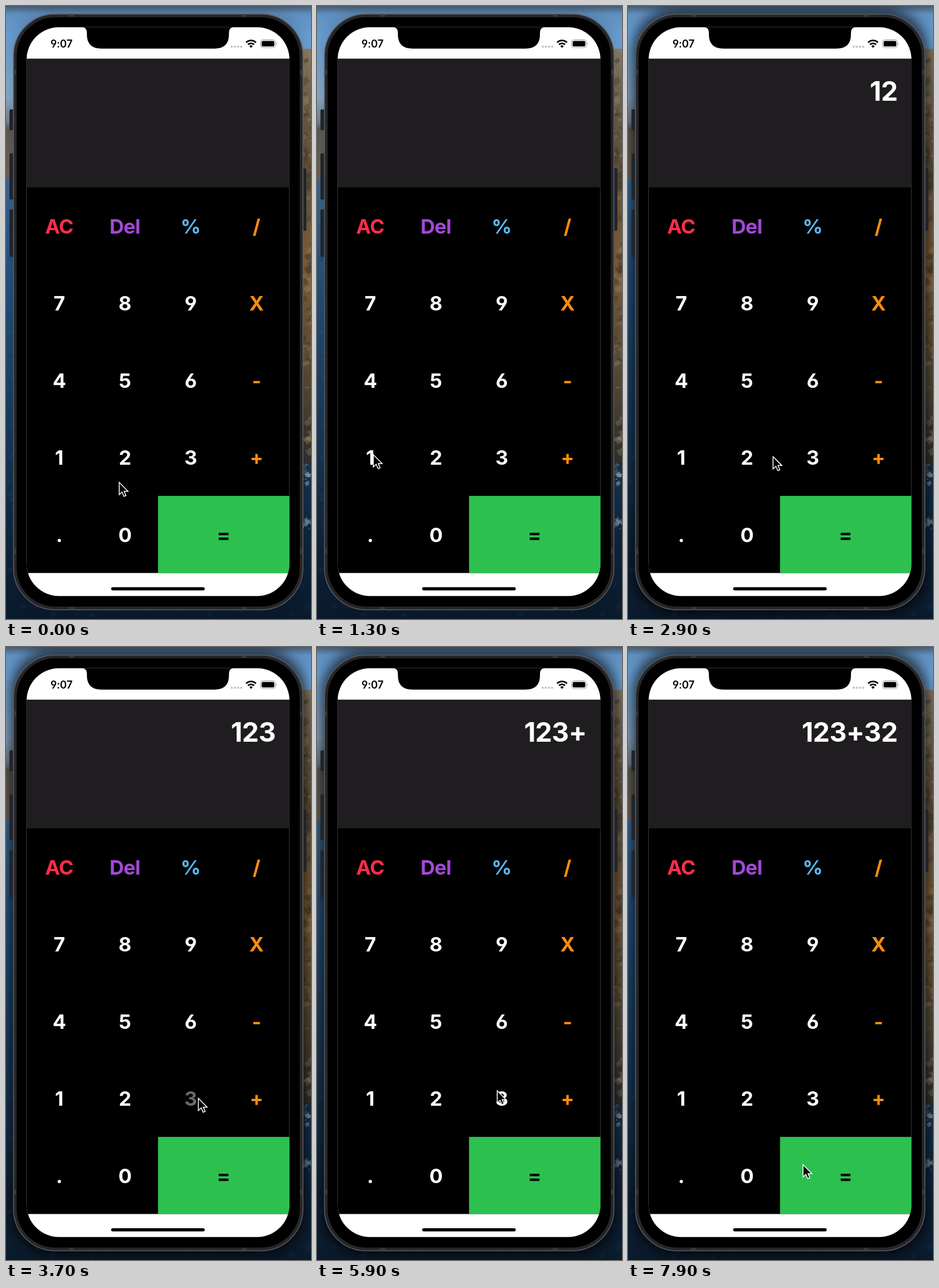
These frames come from a looping animation (528x1061 px, 8 s). An HTML page:

```html
<!DOCTYPE html>
<html lang="en">
<head>
<meta charset="utf-8">
<title>Calculator</title>
<style>
html, body { margin: 0; width: 100%; height: 100%; overflow: hidden; background: #0c1c30; }
svg { display: block; width: 100vw; height: 100vh; }
text { font-family: Inter, "Liberation Sans", sans-serif; font-weight: 700; font-feature-settings: "cv03", "cv04"; }
#keys { font-size: 34.5px; letter-spacing: -.6px; text-anchor: middle; }
#display { font-size: 46.5px; letter-spacing: -.7px; text-anchor: end; fill: #fff; }
#clock { font-size: 18.2px; font-weight: 600; letter-spacing: -.2px; text-anchor: middle; }
</style>
</head>
<body>
<svg viewBox="0 0 528 1061" preserveAspectRatio="none">
  <defs>
    <linearGradient id="coast" x2="0" y2="1">
      <stop offset="0" stop-color="#5c8ab8"/>
      <stop offset=".05" stop-color="#699fd4"/>
      <stop offset=".15" stop-color="#87a9c8"/>
      <stop offset=".19" stop-color="#75818b"/>
      <stop offset=".2" stop-color="#5e5a54"/>
      <stop offset=".28" stop-color="#70624f"/>
      <stop offset=".283" stop-color="#3b6791"/>
      <stop offset=".45" stop-color="#23527e"/>
      <stop offset=".7" stop-color="#183a5b"/>
      <stop offset=".88" stop-color="#0f253c"/>
      <stop offset="1" stop-color="#0a1a2b"/>
    </linearGradient>
    <linearGradient id="cliff" x2="0" y2="1">
      <stop offset="0" stop-color="#8b7d64"/>
      <stop offset=".15" stop-color="#6a5c48"/>
      <stop offset=".3" stop-color="#62513a"/>
      <stop offset=".5" stop-color="#80613a"/>
      <stop offset=".75" stop-color="#5f5039"/>
      <stop offset="1" stop-color="#2f2f2e"/>
    </linearGradient>
    <linearGradient id="topShade" x2="0" y2="1">
      <stop offset="0" stop-color="#3a434d" stop-opacity=".65"/>
      <stop offset="1" stop-color="#3a434d" stop-opacity="0"/>
    </linearGradient>
    <filter id="soft" x="-20%" y="-20%" width="140%" height="140%"><feGaussianBlur stdDeviation="11"/></filter>
    <clipPath id="screen"><rect x="35.700" y="36.700" width="455" height="984.500" rx="56"/></clipPath>
  </defs>

  <rect width="528" height="1061" fill="url(#coast)"/>
  <path d="M480 74H528V795L505 785Z" fill="url(#cliff)"/>
  <g id="texture"></g>
  <rect width="528" height="14" fill="url(#topShade)"/>
  <rect id="shadow" x="8" y="6" width="511" height="1046" rx="74" filter="url(#soft)"/>

  <g fill="#20252b">
    <rect x="6" y="179" width="9" height="36" rx="2"/>
    <rect x="6" y="255" width="9" height="80" rx="2"/>
    <rect x="6" y="352" width="9" height="82" rx="2"/>
    <rect x="512" y="281" width="8" height="108" rx="2"/>
  </g>
  <rect x="13" y="14" width="501" height="1031" rx="72" fill="#262628" stroke="#5d5d60" stroke-width="1.5"/>
  <path d="M109 16.500h9M408 16.500h9M109 1042.500h9M408 1042.500h9M15.500 111v8M511.500 111v8M15.500 939v9M511.500 939v9"
    stroke="#3a3a3d" stroke-width="4"/>
  <rect x="18.500" y="19.500" width="490" height="1020" rx="67"/>

  <g clip-path="url(#screen)">
    <rect x="35" y="36" width="457" height="986" fill="#fff"/>
    <rect x="35" y="91.400" width="457" height="890"/>
    <rect x="35" y="91.400" width="457" height="222.500" fill="#201d20"/>
    <rect x="263.200" y="847.900" width="229" height="133.500" fill="#2dc04f"/>
    <path d="M132 36H394V36.700Q386 37 386 46V49Q386 73.700 361 73.700H165Q140 73.700 140 49V46Q140 37 132 36.700Z"/>
    <rect x="182" y="1006" width="162" height="5.500" rx="2.750"/>
  </g>

  <text id="clock" x="96" y="72">9:07</text>
  <path d="M390.800 70.500h.01m5.400 0h.01m5.400 0h.01m5.400 0h.01" stroke="#c6c6c6" stroke-width="4" stroke-linecap="round"/>
  <g fill="none" stroke="#000" stroke-width="2.800">
    <path d="M415.700 63.200a12 12 0 0 1 17 0M418.900 66.800a7.600 7.600 0 0 1 10.600 0"/>
    <path d="M424.200 72.400l-2.900-3a4.200 4.200 0 0 1 5.800 0z" fill="#000" stroke="none"/>
  </g>
  <rect x="440.500" y="58.500" width="26" height="13.500" rx="4" fill="none" stroke="#999"/>
  <rect x="442.500" y="60.500" width="22" height="9.500" rx="2.300"/>
  <path d="M468 63.200q2 2 0 4z" fill="#999"/>

  <g id="keys"></g>
  <text id="display" x="466.500" y="163.500"></text>
  <path id="cursor" d="M0 0V21.300L4.900 16.800L8.200 24.300L11.700 22.800L8.500 15.400H15.200Z" fill="#000" stroke="#fff" stroke-width="1.500"/>
</svg>

<script>
const LOOP = 8000;
const byId = id => document.getElementById(id);

function add(parent, tag, attributes, label = "") {
  const node = document.createElementNS("http://www.w3.org/2000/svg", tag);
  for (const name in attributes) node.setAttribute(name, attributes[name]);
  node.textContent = label;
  return parent.appendChild(node);
}

// Rock facets, water ripples and surf along the edges of the wallpaper
let seed = 17;
const random = () => (seed = seed * 16807 % 2147483647) / 2147483647;
const pick = list => list[Math.floor(random() * list.length)];

function scatter(count, x, y, width, height, size, colors, opacity) {
  for (let i = 0; i < count; i++) {
    const px = x + random() * width, py = y + random() * height;
    const w = size * (.5 + random()), h = w * (.2 + random() * .5);
    add(byId("texture"), "path", {
      d: `M${px} ${py}l${w} ${-h}l${w * .3} ${h * 1.4}l${-w * .8} ${h}z`,
      fill: pick(colors), opacity
    });
  }
}
scatter(110, 505, 90, 22, 690, 11, ["#33291f", "#43382a", "#99866a", "#a8936f", "#594b35"], .35);
scatter(45, 0, 310, 12, 730, 7, ["#0c2442", "#3d6c98"], .12);
scatter(50, 0, 1000, 528, 60, 8, ["#091627", "#1c3858"], .2);
scatter(30, 510, 790, 16, 36, 5, ["#c4cdd2", "#8b9aa5", "#25313c"], .6);
scatter(14, 512, 885, 14, 22, 5, ["#cbd4da", "#718390"], .5);

// Keypad
const white = "#fff", orange = "#ff8c0d";
const rows = [["AC", "Del", "%", "/"], [..."789X"], [..."456-"], [..."123+"], [".", "0", "="]];
const special = { AC: "#ff2d4b", Del: "#a349d8", "%": "#5bb8f5", "=": "#000" };
const keys = {};
rows.forEach((row, r) => row.forEach((label, c) => {
  keys[label] = add(byId("keys"), "text", {
    x: label === "=" ? 376.5 : 92 + c * 113.8,
    y: 393.6 + r * 133.5,
    fill: special[label] || (c === 3 ? orange : white)
  }, label);
}));

// [release time, key]
const presses = [[1600, "1"], [2500, "2"], [3590, "3"], [4860, "+"], [6250, "3"], [7150, "2"]];

// [move start, move end, x, y]
const moves = [
  [0, 0, 196, 824.5], [500, 1100, 97.5, 776.5], [1700, 2080, 215.5, 779.5], [2700, 3250, 333, 781],
  [4000, 4650, 441, 771], [5200, 5850, 312, 768], [6500, 6950, 215, 778], [7300, 7880, 303, 896]
];

const clamp = v => Math.max(0, Math.min(1, v));
const ease = v => v * v * (3 - 2 * v);

function cursorAt(t) {
  let [, , x, y] = moves[0];
  for (const [start, end, toX, toY] of moves.slice(1)) {
    const k = ease(clamp((t - start) / (end - start)));
    x += (toX - x) * k;
    y += (toY - y) * k;
  }
  return [x, y];
}

// A touched key dims to 20% and fades back after release
function dimming(t, release) {
  const dt = t - release;
  if (dt < -100 || dt > 250) return 1;
  if (dt < 0) return 1 - .8 * ease((dt + 100) / 100);
  return .2 + .8 * ease(clamp((dt - 40) / 210));
}

function draw(t) {
  byId("display").textContent = presses.filter(p => t >= p[0]).map(p => p[1]).join("");
  for (const label in keys) {
    const opacity = Math.min(1, ...presses.filter(p => p[1] === label).map(p => dimming(t, p[0])));
    keys[label].setAttribute("opacity", opacity);
  }
  byId("cursor").setAttribute("transform", `translate(${cursorAt(t)})`);
  // The first click focuses the window, which deepens its shadow
  byId("shadow").setAttribute("opacity", t < 1500 ? .12 : .7);
}

function frame(now) {
  draw(now % LOOP);
  requestAnimationFrame(frame);
}
draw(0);
requestAnimationFrame(frame);
</script>
</body>
</html>
```
